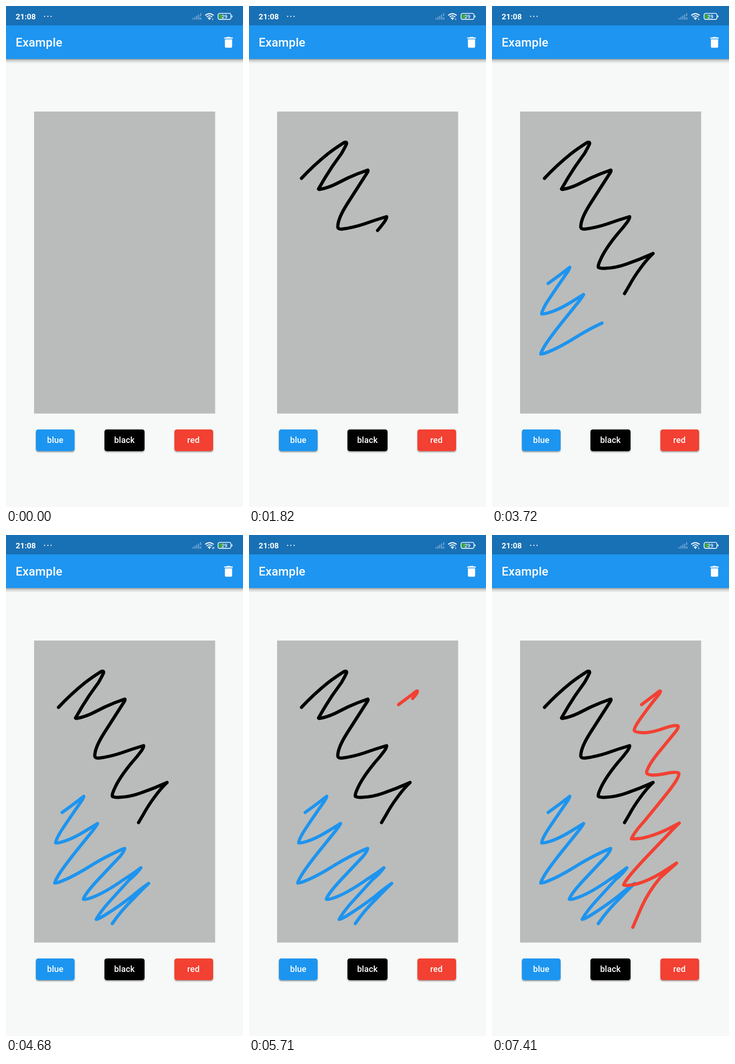
Animation, 515 px wide and 1087 px high, one loop 7.45 s. Source, as an HTML page:

```html
<!DOCTYPE html>
<html lang="en">
<head>
<meta charset="utf-8">
<title>Example</title>
<style>
html, body { margin: 0; width: 100%; height: 100%; overflow: hidden; background: #f6f9f7; }
svg { display: block; width: 100%; height: 100%; }
text { font-family: Roboto, sans-serif; font-weight: 500; fill: #fff; }
.label { font-size: 18.4px; text-anchor: middle; letter-spacing: .1px; }

.pen {
  fill: none; stroke-width: 7; stroke-linecap: round; stroke-linejoin: round;
  stroke-dasharray: 100 200; opacity: 0;
  animation: 7450ms linear infinite;
}
#ink-black { stroke: #000; animation-name: black; }
#ink-blue { stroke: #1e94ef; animation-name: blue; }
#ink-red { stroke: #f24133; animation-name: red; }

@keyframes black {
  0%, 15.63% { opacity: 0; stroke-dashoffset: 100; }
  15.64% { opacity: 1; stroke-dashoffset: 100; }
  28.86%, 100% { opacity: 1; stroke-dashoffset: 0; }
}
@keyframes blue {
  0%, 42.81% { opacity: 0; stroke-dashoffset: 100; }
  42.82% { opacity: 1; stroke-dashoffset: 100; }
  49.93% { opacity: 1; stroke-dashoffset: 54.9; }
  58.93%, 100% { opacity: 1; stroke-dashoffset: 0; }
}
@keyframes red {
  0%, 75.29% { opacity: 0; stroke-dashoffset: 100; }
  75.3% { opacity: 1; stroke-dashoffset: 100; }
  76.64% { opacity: 1; stroke-dashoffset: 94.4; }
  84.03% { opacity: 1; stroke-dashoffset: 26; }
  86.85%, 100% { opacity: 1; stroke-dashoffset: 0; }
}

.glow { fill: #fff; opacity: 0; animation: press 7450ms linear infinite; }
@keyframes press {
  0%, 5.1%, 100% { opacity: 0; }
  1.34%, 2.82% { opacity: .22; }
}
#up { opacity: 0; animation: upload 7450ms step-end infinite; }
@keyframes upload {
  0% { opacity: 0; }
  58.5% { opacity: 1; }
  72% { opacity: 0; }
}
</style>
</head>
<body>
<svg viewBox="0 0 515 1087" preserveAspectRatio="none">
  <defs>
    <linearGradient id="fade" x2="0" y2="1">
      <stop offset="0" stop-color="#000" stop-opacity=".36"/>
      <stop offset=".4" stop-color="#000" stop-opacity=".14"/>
      <stop offset="1" stop-color="#000" stop-opacity="0"/>
    </linearGradient>
    <filter id="lift" x="-10%" y="-20%" width="120%" height="150%">
      <feDropShadow dx="0" dy="2" stdDeviation="1.5" flood-color="#000" flood-opacity=".42"/>
    </filter>
  </defs>

  <rect width="515" height="1087" fill="#f6f9f7"/>
  <rect y="115" width="515" height="10" fill="url(#fade)"/>
  <rect y="42" width="515" height="73" fill="#1e95f0"/>
  <rect width="515" height="42" fill="#1870b5"/>

  <!-- status bar -->
  <text x="21" y="28.7" font-size="17" style="font-weight:700">21:08</text>
  <g fill="#fff">
    <circle cx="84" cy="22.5" r="1.3"/>
    <circle cx="91" cy="22.5" r="1.3"/>
    <circle cx="98" cy="22.5" r="1.3"/>
  </g>
  <g stroke="#fff" fill="none" opacity=".4">
    <path stroke-width="2.2" d="M406.5 29.5V26M410.5 29.5V23.5M414.5 29.5V21M418.5 29.5V18.5M423 22V15.5"/>
    <path stroke-width="1.3" d="M420.8 25L424.8 29.5M424.8 25L420.8 29.5"/>
  </g>
  <g stroke="#fff" fill="none" stroke-width="2">
    <path d="M432.8 20.4Q442 12.8 451.2 20.4"/>
    <path d="M435.9 23.8Q442 18.6 448.1 23.8"/>
    <path d="M438.8 27Q442 24.2 445.2 27"/>
  </g>
  <circle cx="442" cy="28.6" r="1.5" fill="#fff"/>
  <path d="M449 26v4M447.6 28.7l1.4 1.6 1.4-1.6" stroke="#fff" fill="none" opacity=".8"/>
  <path id="up" d="M451.6 30.3v-4M450.3 27.6l1.3-1.6 1.3 1.6" stroke="#fff" fill="none"/>
  <rect x="460.8" y="16" width="28" height="13.2" rx="3.6" fill="none" stroke="#fff" stroke-width="1.7"/>
  <rect x="463" y="18.2" width="7.5" height="8.8" rx="1.5" fill="#3fae2a"/>
  <rect x="490.4" y="20.3" width="1.7" height="4.6" rx=".8" fill="#fff"/>
  <text x="474.8" y="26.6" font-size="11" text-anchor="middle">29</text>

  <!-- app bar -->
  <text x="21" y="88.4" font-size="26.2" letter-spacing=".15">Example</text>
  <path fill="#fff" transform="translate(467.8 63) scale(1.311)"
    d="M6 19c0 1.1.9 2 2 2h8c1.1 0 2-.9 2-2V7H6v12zM19 4h-3.5l-1-1h-5l-1 1H5v2h14V4z"/>

  <!-- drawing area -->
  <rect x="61" y="229" width="393.5" height="655.3" fill="#b9bcba"/>
  <path id="ink-black" class="pen" pathLength="100" d="M114 374Q140 346 171 321Q185 310 207 296
    Q213 294 212 299Q208 308 201 320L181 348Q165 372 151 397Q152 399 158 397Q172 394 187 387
    L215 373Q237 363 258 356Q260 357 256 363L238 391L213 430Q194 460 193 477Q192 485 202 484
    Q226 481 250 473Q275 464 299 457Q301 459 293 470Q285 481 274 493Q245 528 235 552
    Q230 563 231 567Q236 570 247 569Q270 568 292 560Q321 550 350 537Q336 550 321 571
    Q309 587 298 607L288 624"/>
  <path id="ink-blue" class="pen" pathLength="100" d="M122 602Q146 585 169 567Q168 572 160 583
    Q130 626 118 645Q108 662 108 668Q113 669 131 663Q150 656 171 643L199 626Q196 632 188 642
    L150 689Q120 727 113 740Q106 752 106 755Q113 755 128 748Q150 739 190 714Q215 699 239 688
    Q254 681 258 680Q258 684 249 696L199 749Q172 778 168 790Q172 792 188 786Q215 776 255 748
    Q276 735 293 722Q284 735 269 747L227 793Q205 817 196 834Q202 833 216 824Q245 806 275 783
    Q295 766 310 756Q295 770 276 790Q250 815 231 843"/>
  <path id="ink-red" class="pen" pathLength="100" d="M325 368L357 344Q365 337 366 339
    Q366 343 357 353Q346 366 330 388Q309 416 309 424Q312 429 333 429Q350 428 375 419
    Q395 412 404 414Q407 417 398 428L365 468Q340 498 336 514Q335 520 349 521Q361 521 380 517
    Q402 513 406 517Q407 523 397 538Q386 554 375 567Q355 592 331 621Q309 645 303 659
    Q307 660 325 658Q350 653 378 640L407 625Q400 631 387 645L340 694Q292 744 286 759
    Q290 762 310 758Q335 753 370 732L401 712Q385 726 365 744Q340 774 325 807L306 851"/>

  <!-- colour buttons -->
  <g filter="url(#lift)">
    <rect x="65" y="918.7" width="84" height="47" rx="5" fill="#1e95f0"/>
    <rect x="214" y="918.7" width="87" height="47" rx="5"/>
    <rect x="366" y="918.7" width="84" height="47" rx="5" fill="#f24133"/>
  </g>
  <rect class="glow" style="animation-delay:-4870ms" x="65" y="918.7" width="84" height="47" rx="5"/>
  <rect class="glow" style="animation-delay:-6930ms" x="214" y="918.7" width="87" height="47" rx="5"/>
  <rect class="glow" style="animation-delay:-2430ms" x="366" y="918.7" width="84" height="47" rx="5"/>
  <text class="label" x="107" y="948.4">blue</text>
  <text class="label" x="257.3" y="948.4">black</text>
  <text class="label" x="407.3" y="948.4">red</text>
</svg>
</body>
</html>
```
